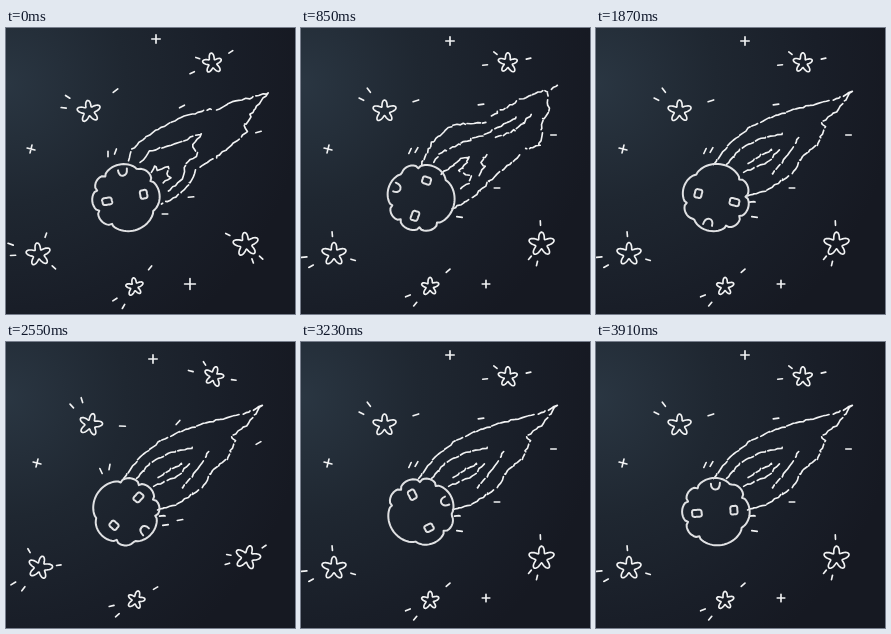
Recreate the animation shown at these times as an HTML page. Size 289 px wide and 286 px high, loop 4.11 s.

```html
<!DOCTYPE html>
<html lang="en">
<head>
<meta charset="utf-8">
<title>Comet doodle</title>
<style>
  html, body { margin: 0; width: 100%; height: 100%; overflow: hidden; background: #1a1e28; }
  svg { display: block; width: 100vw; height: 100vh; }
  .ink { fill: none; stroke: #f1f2f3; stroke-width: 1.65; stroke-linecap: round; stroke-linejoin: round; }
  #rock { stroke: #e0e1e3; stroke-width: 2; }
</style>
</head>
<body>
<svg viewBox="0 0 289 286" preserveAspectRatio="none">
  <defs>
    <radialGradient id="sky" gradientUnits="userSpaceOnUse" cx="0" cy="55" r="300">
      <stop offset="0" stop-color="#2a3642"/>
      <stop offset=".4" stop-color="#1f2731"/>
      <stop offset=".75" stop-color="#191e28"/>
      <stop offset="1" stop-color="#161922"/>
    </radialGradient>
  </defs>
  <rect width="289" height="286" fill="url(#sky)"/>
  <g class="ink">
    <path id="stars"/>
    <path id="tail"/>
    <path id="rock"/>
  </g>
</svg>
<script>
const STEP = 170, LOOP = 4110, STEPS = 24;
const el = id => document.getElementById(id);
const rad = deg => deg * Math.PI / 180;
const lerp = (a, b, u) => a + (b - a) * u;
const polar = (x, y, r, deg) => [x + r * Math.cos(rad(deg)), y + r * Math.sin(rad(deg))];
const line = pts => 'M' + pts.map(p => p[0].toFixed(2) + ' ' + p[1].toFixed(2)).join('L');
const points = s => s.split(' ').map(p => p.split(',').map(Number));

function random(seed) {
  return () => (seed = seed * 16807 % 2147483647) / 2147483647;
}

// Closed outline whose radius depends on the angle
function blob(x, y, radius) {
  const pts = [];
  for (let a = 0; a < 360; a += 4) pts.push(polar(x, y, radius(a), a));
  return line(pts) + 'Z';
}

function tick(x, y, length, deg) {
  return line([polar(x, y, -length / 2, deg), polar(x, y, length / 2, deg)]);
}

// Each tick around a star is [angle, distance]; swing turns the whole ring
const stars = [
  { x: 207, y: 35, r: 10, swing: 20, ticks: [[175, 23], [218, 16], [-12, 21]] },
  { x: 83.5, y: 83, r: 11.5, swing: 20, ticks: [[233, 26], [207, 26], [-18, 33]] },
  { x: 33, y: 226, r: 12, swing: -25, ticks: [[-95, 20], [174, 30], [152, 26], [17, 20]] },
  { x: 240.5, y: 216, r: 12.5, swing: 60, ticks: [[-93, 21], [130, 18], [103, 20]] },
  { x: 129, y: 258.5, r: 9, swing: 10, ticks: [[-41, 24], [157, 24], [130, 23]] }
];
const pluses = [
  { x: 149, y: 13, dx: -1, dy: 2, r: 4.2, shrink: 0, tilt: 0 },
  { x: 27, y: 121, dx: 2, dy: 0, r: 4, shrink: 0, tilt: 14 },
  { x: 185, y: 256, dx: 1, dy: 0, r: 3.8, shrink: 1.6, tilt: 0 }
];
const streaks = [
  { x: 109, y: 123, dx: -7, dy: 3, deg: -65, turn: -25 },
  { x: 115.5, y: 122, dx: -6, dy: 1.5, deg: -60, turn: -10 },
  { x: 180, y: 76.5, dx: -4, dy: 2, deg: -8, turn: -20 },
  { x: 252.5, y: 107, dx: 0, dy: -3, deg: 0, turn: -15 },
  { x: 196, y: 160, dx: -11, dy: 9, deg: 0, turn: -5 },
  { x: 158.5, y: 189, dx: .5, dy: -3, deg: 8, turn: -8 }
];

// The sky sways between phase 0 and 3, resting around phase 1
function drawSky(phase) {
  const off = phase - 1, far = Math.abs(off);
  const turn = off < 0 ? off : off / 4;
  let d = '';
  for (const s of stars) {
    const x = s.x + off * .5, y = s.y - off * .3;
    const tilt = off * 7 - 90;
    d += blob(x, y, a => s.r * (.72 + .28 * Math.cos(5 * rad(a - tilt)) + .05 * Math.sin(2 * rad(a) + s.x)));
    for (const [deg, dist] of s.ticks) {
      const a = deg + s.swing * 2 * turn / (off < 0 ? 2 : 1);
      d += tick(...polar(s.x, s.y, dist, a), 2.5 + dist / 10, a);
    }
  }
  for (const p of pluses) {
    const r = p.r - p.shrink * off, x = p.x + p.dx * off, y = p.y + p.dy * off;
    if (r < 1) continue;
    for (const a of [0, 90]) d += tick(x, y, r * 2, p.tilt + a);
  }
  for (const s of streaks)
    d += tick(s.x + s.dx * far, s.y + s.dy * far, 5.5, s.deg + s.turn * far);
  return d;
}

// Follows a polyline in short, shaky pen strokes
function scribble(pts, rnd, { dash, gap, shake }) {
  const spans = pts.slice(1).map((p, i) => Math.hypot(p[0] - pts[i][0], p[1] - pts[i][1]));
  const total = spans.reduce((a, b) => a + b);
  const at = s => {
    let i = 0;
    while (i < spans.length - 1 && s > spans[i]) s -= spans[i++];
    return pts[i].map((v, j) => lerp(v, pts[i + 1][j], s / spans[i]) + (rnd() - .5) * shake);
  };
  let d = '';
  for (let s = 0; s < total;) {
    const end = Math.min(total, s + dash * (.5 + rnd()));
    const stroke = [];
    for (; s < end; s += 3.5) stroke.push(at(s));
    stroke.push(at(end));
    d += line(stroke);
    s = end + gap * (.3 + rnd());
  }
  return d;
}

const sharp = {
  pen: { dash: 20, gap: 2.5, shake: 1.6 },
  lines: [
    '122,133 125,123 131,117 142,107 157,99 176,89 205,81', '211,82 225,74 240,71 262,65',
    '262,65 243,88 246,89 238,97 242,103 215,126 194,139', '190,142 182,158 170,169 155,176',
    '134,134 144,123 172,115 196,105 186,118 192,126 180,136 176,152 162,163',
    '145,144 150,137 152,142 163,138 160,147 165,149 157,155'
  ]
};
const ragged = {
  pen: { dash: 9, gap: 2.5, shake: 1.8 },
  lines: [
    '120,137 131,115 151,97 185,94', '190,88 222,70 245,62 247,68', '250,62 256,57',
    '246,72 248,83 240,95 241,105 238,118 224,121', '219,127 203,140 195,147 172,169 150,182',
    '132,134 140,125 165,113 180,108 200,98 217,89', '195,110 214,102 231,87',
    '141,146 160,131 169,129 158,144', '162,146 170,148 169,155 160,160',
    '186,127 180,133 184,139 178,147'
  ]
};
const smooth = {
  pen: { dash: 11, gap: 3, shake: 1.3 },
  lines: [
    '118,136 133,116 153,100 178,88 200,81', '200,81 235,72 243,70 256,63',
    '256,63 240,84 225,95 229,99 221,117', '219,118 205,130 197,145 172,162 152,168',
    '130,137 143,122 165,110 190,105', '203,109 198,118 184,137 176,146',
    '152,136 165,127 176,122', '148,144 172,134 183,122', '154,174 159,174'
  ]
};
const tails = [sharp, ragged, sharp, smooth].map(({ pen, lines }, i) => {
  const rnd = random(911 + i * 77);
  return lines.map(s => scribble(points(s), rnd, pen)).join('');
});

// Rock: lobes bulge between notches at these angles
const notches = [-62, -28, 31, 124, 160, 200, 232, 298];
function rockRadius(a) {
  if (a > 298) a -= 360;
  const i = notches.findIndex(n => n > a);
  const u = (a - notches[i - 1]) / (notches[i] - notches[i - 1]);
  return 29.6 + 4.2 * Math.sqrt(Math.sin(Math.PI * u));
}
function crater(x, y, w, h) {
  return blob(x, y, a => 1 + .1 * Math.cos(4 * rad(a - 40)))
    .replace(/([\d.-]+) ([\d.-]+)/g, (_, px, py) => `${x + (px - x) * w} ${y + (py - y) * h}`);
}
el('rock').setAttribute('d', blob(0, 0, rockRadius) +
  crater(-19, 1.6, 5.2, 3.8) + crater(18, -1.5, 3.8, 4.6) + 'M-5 -28C-5 -20 4 -20 4 -29');

// Tumble: key steps and angles
const spin = [[0, -6], [5, -67], [9, -117], [11, -162], [15, -224], [19, -292], [23, -360]];
function rockAngle(k) {
  const i = Math.max(1, spin.findIndex(p => p[0] >= k));
  const [k0, a0] = spin[i - 1], [k1, a1] = spin[i];
  return lerp(a0, a1, (k - k0) / (k1 - k0));
}

function draw(t) {
  const k = Math.min(STEPS - 1, Math.floor((t % LOOP) / STEP));
  const phase = 3 - Math.abs(3 - k % 6);
  el('stars').setAttribute('d', drawSky(phase));
  el('tail').setAttribute('d', tails[k % 4]);
  el('rock').setAttribute('transform', `translate(119.9 169.7) rotate(${rockAngle(k)})`);
}

const start = performance.now();
function frame() {
  draw(performance.now() - start);
  requestAnimationFrame(frame);
}
frame();
</script>
</body>
</html>
```
